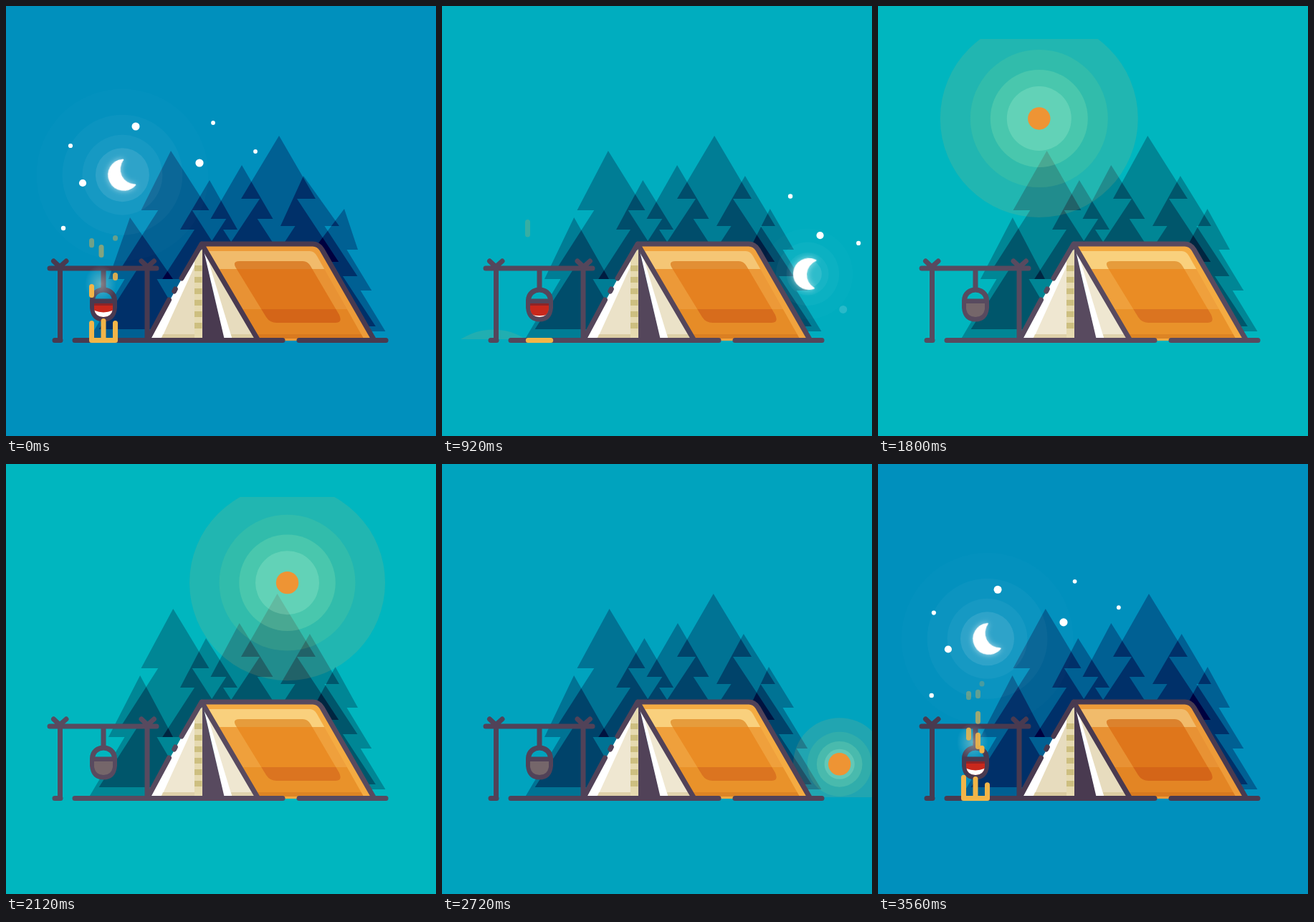
Write an HTML page that moves like this. It is 600 px wide and 600 px high and loops after 3600 ms.

```html
<!DOCTYPE html>
<html lang="en">
<head>
<meta charset="utf-8">
<title>Camp, day and night</title>
<style>
html, body { margin: 0; width: 100%; height: 100%; overflow: hidden; background: #0090bd; }
svg { display: block; width: 100vw; height: 100vh; isolation: isolate; }
#trees path { fill: #00302a; mix-blend-mode: difference; }
#crescent { filter: drop-shadow(0 0 4px rgba(255, 255, 255, .6)); }
.line { fill: none; stroke: var(--line); stroke-width: 7; stroke-linecap: round; stroke-linejoin: round; }
.ember { stroke: #f2b548; stroke-width: 7; stroke-linecap: round; fill: none; }
.cloth { fill: var(--cloth); }
.warm { fill: #be3c00; opacity: calc(.14 * var(--warm)); }
</style>
</head>
<body>
<svg id="stage" viewBox="0 0 600 600" xmlns="http://www.w3.org/2000/svg">
  <defs>
    <clipPath id="sky"><rect y="46" width="600" height="419"/></clipPath>
    <clipPath id="panel"><path d="M283 342H424Q430 342 434 349L499 464H353Z"/></clipPath>
    <clipPath id="patch"><path d="M326 356H414Q421 356 425 363L465 431Q470 442 460 442H378Q368 442 363 434L320 364Q316 356 326 356Z"/></clipPath>
    <clipPath id="bowl"><path d="M123 415H149V423Q147 434 136 434Q125 434 123 423Z"/></clipPath>
    <radialGradient id="steam">
      <stop offset="0" stop-color="#d8dccb" stop-opacity=".45"/>
      <stop offset="1" stop-color="#a8dce6" stop-opacity="0"/>
    </radialGradient>
  </defs>

  <rect id="bg" width="600" height="600"/>
  <g id="trees"></g>

  <g clip-path="url(#sky)">
    <g id="sun">
      <g id="sunHalo">
        <circle r="138" fill="#ffb45a" fill-opacity=".13"/>
        <circle r="96" fill="#b4e678" fill-opacity=".11"/>
        <circle r="68" fill="#c8ffb4" fill-opacity=".16"/>
        <circle r="45" fill="#c8ffdc" fill-opacity=".2"/>
      </g>
      <circle r="15.7" fill="#ee9434"/>
    </g>
    <g id="stars" fill="#fff"></g>
    <g id="moon">
      <g id="moonHalo" fill="#fff">
        <circle r="120" fill-opacity=".01"/>
        <circle r="84" fill-opacity=".032"/>
        <circle r="56" fill-opacity=".045"/>
        <circle r="37.5" fill-opacity=".1"/>
      </g>
      <path id="crescent" fill="#fff" stroke="#fff" stroke-width="1.6" stroke-linejoin="round"
        d="M8.4 -19.4A21.2 21.2 0 1 0 8.4 19.4A21.5 21.5 0 0 1 8.4 -19.4Z"/>
    </g>
  </g>

  <!-- tent side -->
  <path d="M273 332H428Q436 332 441 340L514 467H350Z" fill="#f4ab42"/>
  <g clip-path="url(#panel)">
    <rect x="270" y="342" width="250" height="25" fill="#f9d07d"/>
    <rect x="270" y="367" width="250" height="56" fill="#efa03c"/>
    <rect x="270" y="423" width="250" height="44" fill="#e9922a"/>
    <rect x="270" y="458" width="250" height="9" fill="#b85a10" fill-opacity=".25"/>
  </g>
  <g clip-path="url(#patch)">
    <rect x="310" y="350" width="165" height="17" fill="#e69c3c"/>
    <rect x="310" y="367" width="165" height="56" fill="#ea8c24"/>
    <rect x="310" y="423" width="165" height="22" fill="#db7420"/>
    <rect x="310" y="350" width="165" height="95" class="warm"/>
  </g>
  <path d="M273 332H428Q436 332 441 340L514 467H350Z" class="warm"/>

  <!-- tent front -->
  <path d="M272 332L198 466H274Z" fill="#fff"/>
  <path class="cloth" d="M271 346L216 466H274V340Z"/>
  <path d="M219 458H274V466H215Z" fill="#c8b478" fill-opacity=".45"/>
  <g id="zip"><path d="M263 356L274 338V466H263Z" fill="#e6dab0"/></g>
  <path d="M274 335V467H306Z" fill="var(--line)"/>
  <path d="M275 338L305 466H318L281 345Z" fill="#fff"/>
  <path class="cloth" d="M278 341L316 466H350Z"/>
  <path d="M314 458H345L350 466H316Z" fill="#c8b478" fill-opacity=".4"/>
  <path class="line" d="M245 380L273 332H428Q436 332 441 340L513 465M273 332L351 465M236.300 395L234.800 398M227.500 410L198 465"/>

  <!-- fire place -->
  <path class="line" d="M61 366H210M75.500 367V466.500M197 367V466.500M66.500 356L75 364L84 356M189 356L197.500 364L206.500 356M68 466.500H76M96 466.500H386M409 466.500H530"/>
  <path class="line" d="M136 367V395M120.500 411C121 391 151 391 151.500 411"/>
  <ellipse id="glow" cx="132" cy="388" rx="22" ry="27" fill="url(#steam)"/>
  <g id="sparks"></g>
  <path d="M120.500 412H151.500V421Q150 437 136 437Q122 437 120.500 421Z" class="line" style="fill:var(--line)"/>
  <g clip-path="url(#bowl)">
    <rect x="120" y="415" width="32" height="22" fill="#75666a"/>
    <g id="soup">
      <rect x="120" y="415" width="32" height="22" fill="#c9281c"/>
      <rect x="120" y="415" width="32" height="3" fill="#8f2426"/>
      <path id="foam" d="M121 424Q136 431 151 424V437H121Z" fill="#fff"/>
    </g>
  </g>
  <path id="fire" class="ember"/>
</svg>

<script>
const STEP = 40, FRAMES = 90, CX = 296, CY = 406, GROUND = 466, RAD = Math.PI / 180;
const $ = id => document.getElementById(id);
const clamp = v => Math.max(0, Math.min(1, v));
const ramp = (n, a, b) => (1 - Math.cos(Math.PI * clamp((n - a) / (b - a)))) / 2;
const mix = (a, b, p) => `rgb(${a.map((v, i) => Math.round(v + (b[i] - v) * p))})`;

function add(parent, tag, attrs) {
  const el = document.createElementNS("http://www.w3.org/2000/svg", tag);
  for (const k in attrs) el.setAttribute(k, attrs[k]);
  return $(parent).appendChild(el);
}

// Centre x, top y, half width and height of the first tier, tiers, starting lean
const TREES = [
  [188, 295, 45, 86, 2, -13],
  [236, 202, 47.5, 83, 3, -4],
  [283, 243, 40, 69, 2, 3],
  [329, 222, 43.5, 75, 2, 2],
  [380, 181, 52, 88, 2, 3],
  [424, 237, 41, 70, 3, -7],
  [460, 283, 31, 57, 3, 14]
].map(t => [...t, add("trees", "path", {})]);

// Stars: start position and radius
const STARS = [
  [181, 168, 5.5], [289, 163, 2.9], [90, 195, 3.1], [107, 247, 5.1],
  [270, 219, 5.6], [348, 203, 2.9], [80, 310, 3.2]
].map(([x, y, r]) => ({
  dist: Math.hypot(x - CX, y - CY),
  angle: Math.atan2(CY - y, CX - x) / RAD,
  el: add("stars", "circle", { r })
}));

// Spark lanes before and after midnight: x, top edge, spacing, length
const LANES = {
  before: [[126.5, 361, 51, 18], [139.5, 338, 30, 18], [145, 386, 90, 11]],
  after: [[119.5, 388, 64, 19], [133, 333, 75, 18], [152.5, 372, 52, 11]]
};
const SPARKS = Object.entries(LANES).flatMap(([side, lanes]) =>
  lanes.flatMap(([x, top, gap, len]) => [-1, 0, 1].map(j => ({
    x, late: side === "after", top: top - gap * j, len: len * (1 - 0.3 * j),
    el: add("sparks", "path", { class: "ember" })
  }))));

for (let y = 362; y < 458; y += 16)
  add("zip", "rect", { x: 263, y, width: 10.5, height: 8, fill: "#cdbf80" });

const orbit = (dist, deg) => [CX - dist * Math.cos(deg * RAD), CY - dist * Math.sin(deg * RAD)];
const place = (el, [x, y]) => el.setAttribute("transform", `translate(${x} ${y})`);
const show = (el, on) => el.style.display = on ? "" : "none";
const halo = d => Math.max(0, 1 - (Math.max(0, d) / 24) ** 2);

function drawTree([cx, top, w, drop, tiers, lean, el], i, f) {
  const tip = cx - 2 + lean * Math.exp(-f / 7) + 2 * Math.sin(f / 6 + i) * clamp(f / 8);
  const left = [], right = [];
  for (let k = 1; k <= tiers; k++) {
    const y = Math.min(top + drop * k, GROUND);
    const half = w * (0.38 + 0.62 * k);
    for (const h of k < tiers ? [half, half - w / 2] : [half]) {
      left.unshift(cx - h, y);
      right.push(cx + h, y);
    }
  }
  el.setAttribute("d", `M${tip} ${top}L${right.join(" ")} ${left.join(" ")}Z`);
}

function drawSun(f) {
  show($("sun"), f > 14 && f < 75);
  place($("sun"), orbit(259, 36.2 + (f - 37) * 4.73));
  const size = f < 44 ? halo(38 - f) : halo(f - 50.5);
  $("sunHalo").setAttribute("transform", `scale(${size})`);
}

function drawNight(n) {
  const up = Math.abs(n) < 30;
  const turn = 3.4 * n + 0.0034 * n ** 3;
  show($("moon"), up);
  show($("stars"), up);
  place($("moon"), orbit(216.5, 51.9 + turn));
  $("moonHalo").setAttribute("transform", `scale(${halo(Math.abs(n) - 6.5)})`);
  $("crescent").setAttribute("transform", `translate(2 0) rotate(${-26 + 1.3 * n})`);
  for (const s of STARS) {
    const a = s.angle + turn;
    place(s.el, orbit(s.dist, a));
    s.el.setAttribute("opacity", clamp((Math.min(a, 180 - a) + 6) / 14));
  }
}

function drawFire(n) {
  const bar = 33 * ramp(n, -18, -9) * (1 - ramp(n, 22, 29));
  const power = ramp(n, -11, -3) * (1 - ramp(n, 8, 21));
  let d = bar > 0.5 ? `M${136 - bar / 2} 466.500h${bar}` : "";
  if (power > 0.02) for (let i = -1; i < 2; i++) {
    const flame = i ? 24 + 8 * i * Math.sin(n * 0.7) : 27;
    d += `M${136 + 16.5 * i} 466.500v${-flame * power}`;
  }
  $("fire").setAttribute("d", d);

  for (const s of SPARKS) {
    const top = s.top - 6.7 * n;
    const live = n > -12 && n < 26 && s.late === (n >= 0) && top > 290 && top < 406;
    show(s.el, live);
    s.el.setAttribute("d", `M${s.x} ${top + 3.5}v${Math.max(0.01, s.len - 7)}`);
    s.el.setAttribute("opacity", 0.2 + 0.8 * clamp((top - 295) / 90));
  }
}

function draw(f) {
  const n = f > 50 ? f - FRAMES : f; // steps from midnight
  const day = ramp(f, 14, 27.5) * (1 - ramp(f, 61, 75));
  const warm = n < 0 ? ramp(n, -18, -3) : 1 - ramp(n, 6, 38);
  const css = $("stage").style;

  $("bg").setAttribute("fill", mix([0, 144, 189], [0, 182, 191], day));
  css.setProperty("--line", mix([73, 58, 80], [88, 74, 95], day));
  css.setProperty("--cloth", mix([239, 231, 209], [231, 220, 190], warm));
  css.setProperty("--warm", warm);

  TREES.forEach((t, i) => drawTree(t, i, f));
  drawSun(f);
  drawNight(n);
  drawFire(n);

  $("glow").setAttribute("opacity", ramp(n, -10, -3) * (1 - ramp(n, 5, 20)));
  $("soup").setAttribute("opacity", ramp(n, -13, -5) * (1 - ramp(n, 24, 31)));
  $("foam").setAttribute("transform", `translate(0 ${5 * ramp(n, 8, 25)})`);
}

const start = performance.now();
function tick() {
  draw(Math.floor((performance.now() - start) / STEP) % FRAMES);
  requestAnimationFrame(tick);
}
tick();
</script>
</body>
</html>
```
